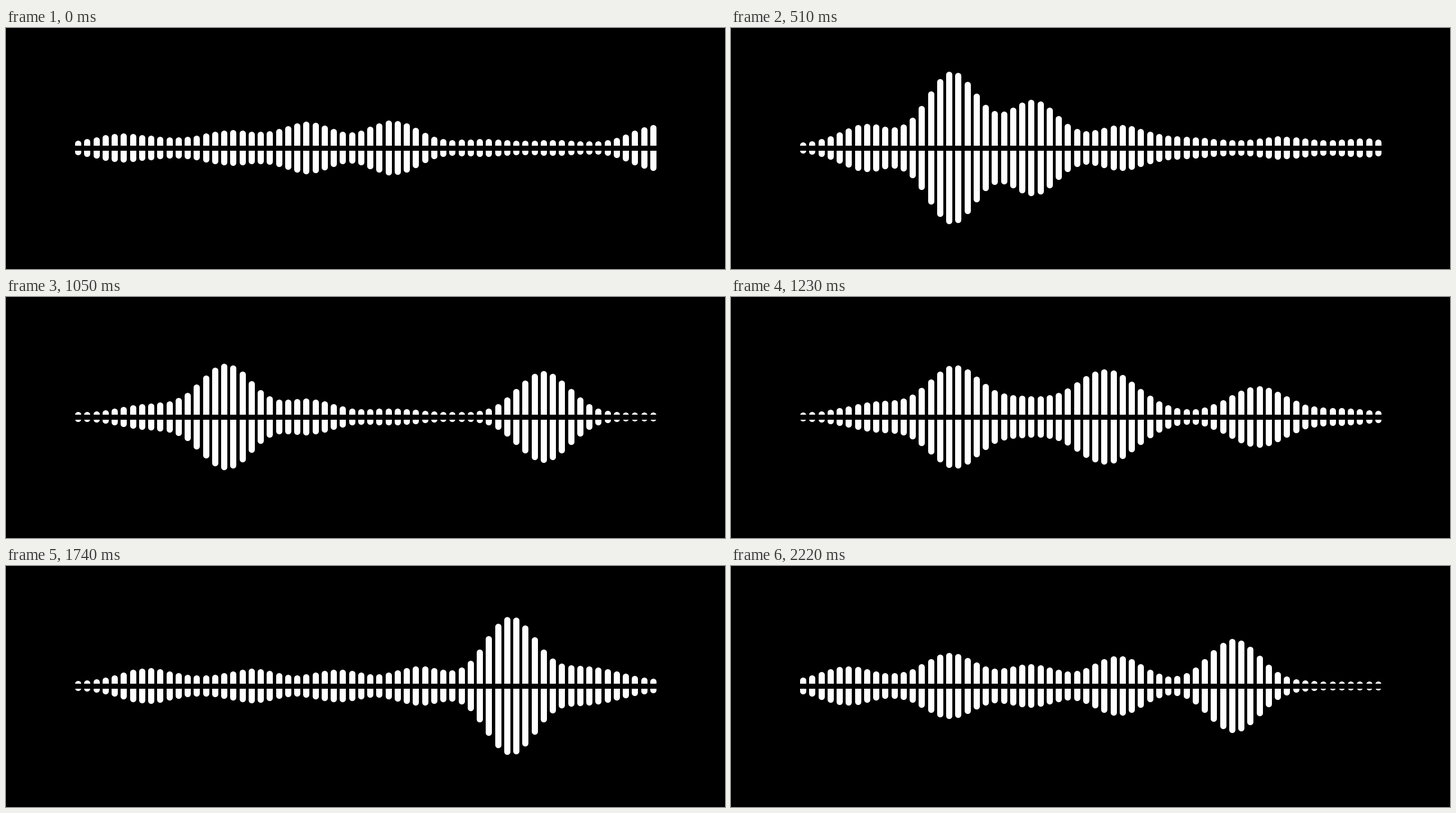
Write an HTML page with a canvas that moves like this. It is 1280 px wide and 430 px high and loops after 2.25 s.

```html
<!DOCTYPE html>
<html lang="en">
<head>
<meta charset="utf-8">
<title>Sound wave</title>
<style>
  html, body { margin: 0; width: 100%; height: 100%; overflow: hidden; background: #000; }
  canvas { display: block; }
</style>
</head>
<body>
<canvas id="stage" width="1280" height="430"></canvas>
<script>
const LOOP = 2250, STEP = 30;
const BARS = 64, FIRST_X = 128.5, PITCH = 1024 / 63, BAR_W = 11;
const MID_Y = 214, GAP_TOP = 210, GAP_H = 9;
const REST = 8, LOBE_W = 2.8;

const ctx = document.getElementById('stage').getContext('2d');

// The wave is a sum of bell-shaped lobes; each pose names its lobes as [bar, height].
const poses = [];
const pose = (time, ...lobes) => poses.push({ time, lobes });

pose(0, [4.4, 16], [9.3, 7], [16.2, 21], [20.3, 6], [25.3, 37], [34.5, 41], [44.5, 8], [52.5, 6], [63.5, 34]);
pose(300, [7, 18], [13, 3], [16.4, 30], [20, 5], [25.2, 53], [35.6, 22], [42.2, 12], [53, 16]);
pose(750, [6.8, 28], [16.3, 126], [25.3, 40], [34.5, 35], [46, 5], [52, 14], [61.5, 26]);
pose(1050, [7, 12], [11, 7], [16.3, 86], [25.2, 24], [34.5, 7], [51, 74]);
pose(1440, [8.8, 22], [17, 76], [22.8, 20], [29.5, 22], [33.1, 130], [37, 28], [48.4, 35], [59, 22]);
pose(1740, [7.4, 23], [13, 6], [19.2, 22], [28.4, 21], [37.4, 27], [47.4, 116], [55.5, 24], [60, 7]);
pose(2220, [4.6, 25], [9, 6], [16, 50], [20.5, 3], [25.1, 30], [34.5, 46], [47.2, 76]);

const bell = d => Math.exp(-d * d / (2 * LOBE_W * LOBE_W));
const flicker = (bar, t) => Math.sin(2 * Math.PI * (t / 220 + bar * 0.121 - 0.04));

// Lobes of both neighbouring poses fade across and pulse in between.
function lobesAt(t) {
  let k = 0;
  while (k < poses.length - 2 && t >= poses[k + 1].time) k++;
  const from = poses[k], to = poses[k + 1];
  const mix = (t - from.time) / (to.time - from.time);
  const swing = Math.sin(Math.PI * mix);
  const fade = (lobes, weight) => lobes.map(([bar, height]) =>
    [bar, height * weight * (1 + swing * (0.2 + 0.5 * flicker(bar, t)))]);
  return [...fade(from.lobes, 1 - mix), ...fade(to.lobes, mix)];
}

function draw(t) {
  const lobes = lobesAt(t);
  ctx.fillStyle = '#000';
  ctx.fillRect(0, 0, 1280, 430);
  ctx.fillStyle = '#fff';
  ctx.beginPath();
  for (let i = 0; i < BARS; i++) {
    const lift = lobes.reduce((sum, [bar, height]) => sum + height * bell(i - bar), 0);
    const h = Math.round(REST + lift);
    const x = Math.round(FIRST_X + i * PITCH - BAR_W / 2);
    ctx.roundRect(x, MID_Y - h, BAR_W, 2 * h, BAR_W / 2);
  }
  ctx.fill();
  ctx.fillStyle = '#000';
  ctx.fillRect(0, GAP_TOP, 1280, GAP_H);
}

const begin = performance.now();
function tick() {
  const t = (performance.now() - begin) % LOOP;
  draw(Math.floor(t / STEP) * STEP);
  requestAnimationFrame(tick);
}
tick();
</script>
</body>
</html>
```
